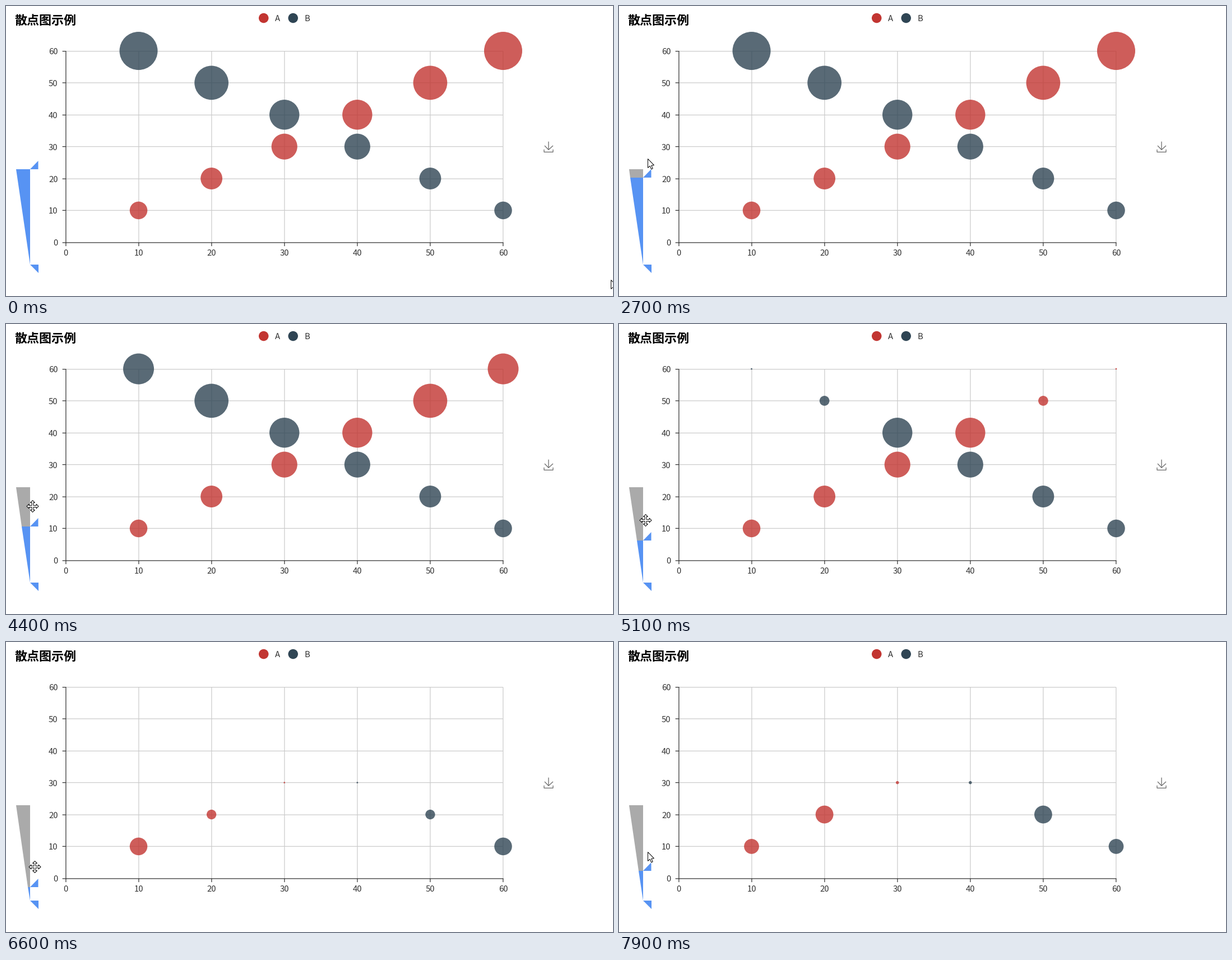
Recreate the animation shown at these times as a matplotlib script. Size 1083 by 517 pixels, loop 8 s.

```python
import numpy as np
import matplotlib.pyplot as plt
from matplotlib.animation import FuncAnimation
from matplotlib.patches import Circle, Polygon

W, H, DPI = 1083, 517, 72          # at 72 dpi one point is one pixel
FRAMES, STEP = 80, 100
RED, NAVY, BLUE, GREY = "#c23531", "#2f4554", "#5793f3", "#aaaaaa"
FONT = "Noto Sans CJK JP"
TOP, BOTTOM, LEFT, RIGHT = 291, 461, 18, 43   # range slider
TAU = 235                                     # bubble easing time, ms
UNIT = 1.25                                   # screen scale, also the line width

fig = plt.figure(figsize=((W + 1e-6) / DPI, (H + 1e-6) / DPI), dpi=DPI, facecolor="white")
ax = fig.add_axes([0, 0, 1, 1])
ax.set_xlim(0, W)
ax.set_ylim(H, 0)
ax.axis("off")


def px(v):
    return 106.4 + 13.01 * v


def py(v):
    return 421.3 - 5.688 * v


def snap(p):
    return (np.floor(p / UNIT) + .5) * UNIT


def line(xs, ys, color, z=1):
    ax.plot(xs, ys, color=color, lw=UNIT, zorder=z, snap=False,
            solid_capstyle="butt", solid_joinstyle="miter")


def label(x, y, text, size=14.8, color="#333333", **kw):
    ax.text(x, y, text, fontsize=size, color=color, family=FONT, va="baseline", **kw)


def shape(color, z=4, edge="none", lw=0):
    return ax.add_patch(Polygon([(0, 0)] * 3, closed=True, fc=color, ec=edge, lw=lw,
                                zorder=z, joinstyle="miter"))


# Grid, axes and labels
x0, x1, y0, y1 = snap(px(0)), snap(px(60)), snap(py(0)), snap(py(60))
for v in range(0, 61, 10):
    gx, gy = snap(px(v)), snap(py(v))
    if v:
        line([gx, gx], [y0, y1], "#cccccc")
        line([x0, x1], [gy, gy], "#cccccc")
    line([gx, gx], [y0, y0 + 5 * UNIT], "#333333", 2)
    line([x0 - 5 * UNIT, x0], [gy, gy], "#333333", 2)
    label(px(v), 445, str(v), ha="center")
    label(92.5, py(v) + 6, str(v), ha="right")
line([x0, x1 + UNIT / 2], [y0, y0], "#333333", 2)
line([x0, x0], [y0 + UNIT / 2, y1 - UNIT / 2], "#333333", 2)

# Title, legend and download icon
label(15, 33, "散点图示例", 22, "black", weight="bold")
for cx, name, color in ((459.7, "A", RED), (512.2, "B", NAVY)):
    ax.add_patch(Circle((cx, 21.5), 8.75, fc=color, lw=0))
    label(cx + 20.4, 27, name)
for xs, ys in (([961, 968, 976], [249, 256.3, 249]),
               ([960, 960, 976, 976], [255.8, 260.4, 260.4, 255.8]),
               ([968, 968], [241.7, 256.3])):
    line(xs, ys, "#666666")

# Bubbles: A rises, B falls
VALUES = np.arange(10, 61, 10)
bubbles = []
for i, v in enumerate(VALUES):
    for x, color in ((v, RED), (70 - v, NAVY)):
        dot = Circle((px(x), py(v)), 1, fc=color, alpha=.8, lw=0, zorder=3)
        bubbles.append((i, 12.1 + .365 * v, ax.add_patch(dot)))

# Slider and cursors
unused, used, grip = shape(GREY), shape(BLUE), shape(BLUE)
shape(BLUE).set_xy([(RIGHT, BOTTOM), (57.5, BOTTOM), (57.5, BOTTOM + 15)])
arrow = shape("white", 9, "black", 1)
mover = shape("white", 9, "black", 1)

ARROW = np.array([(0, 0), (0, 16), (3.7, 12.6), (6.2, 18.4), (8.7, 17.3),
                  (6.3, 11.7), (11, 11.3)]) + .5
ARM = np.array([(-1.5, -1.5), (-1.5, -6.5), (-4, -6.5), (0, -10.5), (4, -6.5), (1.5, -6.5)])
MOVE = np.vstack([ARM @ np.array([(c, s), (-s, c)])
                  for c, s in ((1, 0), (0, 1), (-1, 0), (0, -1))])

# Drag of the upper handle: key times and heights
DRAG_T, DRAG_Y = zip((2300, 291), (4100, 358), (4340, 358), (4400, 361), (5100, 386),
                     (5930, 409.4), (6000, 416), (6400, 426.4), (6600, 437),
                     (7000, 453), (7450, 450), (7500, 426), (7900, 408))


def handle_at(t):
    return np.interp(t, DRAG_T, DRAG_Y)


def bubble_sizes():
    """Scale of each bubble per frame, easing towards shown or hidden."""
    dt, scale, out = 10, np.ones(len(VALUES)), []
    for t in range(0, FRAMES * STEP, dt):
        if t % STEP == 0:
            out.append(scale.copy())
        shown = handle_at(t) <= BOTTOM - .6 - 1.7 * VALUES
        scale += (shown - scale) * (1 - np.exp(-dt / TAU))
    return out


SIZES = bubble_sizes()


def cursor_at(t):
    """Kind and position of the pointer; kind is None while it is off stage."""
    if t < 200:
        return "arrow", 1079 - .62 * t, 488 + .17 * t
    if t < 700:
        return None, 0, 0
    if t < 2400:
        far = max(0, (1500 - t) / 800) ** 2
        drift = np.clip((t - 1600) / 300, 0, 1)
        return "arrow" if t < 1500 else "move", 51 + 196 * far, 260 + 218 * far - 5 * drift
    h = handle_at(t)
    if 2500 <= t < 3000 or t >= 7400:
        return "arrow", 51, h - 34
    return "move", 47 if 4000 <= t < 6300 else 51, h - 36


def draw(n):
    t = n * STEP
    h = handle_at(t)
    edge = LEFT + (RIGHT - LEFT) * (h - TOP) / (BOTTOM - TOP)
    unused.set_xy([(LEFT, TOP), (RIGHT, TOP), (RIGHT, h), (edge, h)])
    used.set_xy([(edge, h), (RIGHT, h), (RIGHT, BOTTOM)])
    grip.set_xy([(RIGHT, h), (57.5, h - 15), (57.5, h)])
    for i, radius, dot in bubbles:
        dot.set_radius(radius * SIZES[n][i])
    kind, x, y = cursor_at(t)
    arrow.set_visible(kind == "arrow")
    mover.set_visible(kind == "move")
    arrow.set_xy(ARROW + np.round((x, y)))
    mover.set_xy(MOVE + np.round((x, y)) + (.5, 0))
    return []


anim = FuncAnimation(fig, draw, frames=FRAMES, interval=STEP, repeat=True,
                     repeat_delay=0, blit=False)
plt.show()
```
